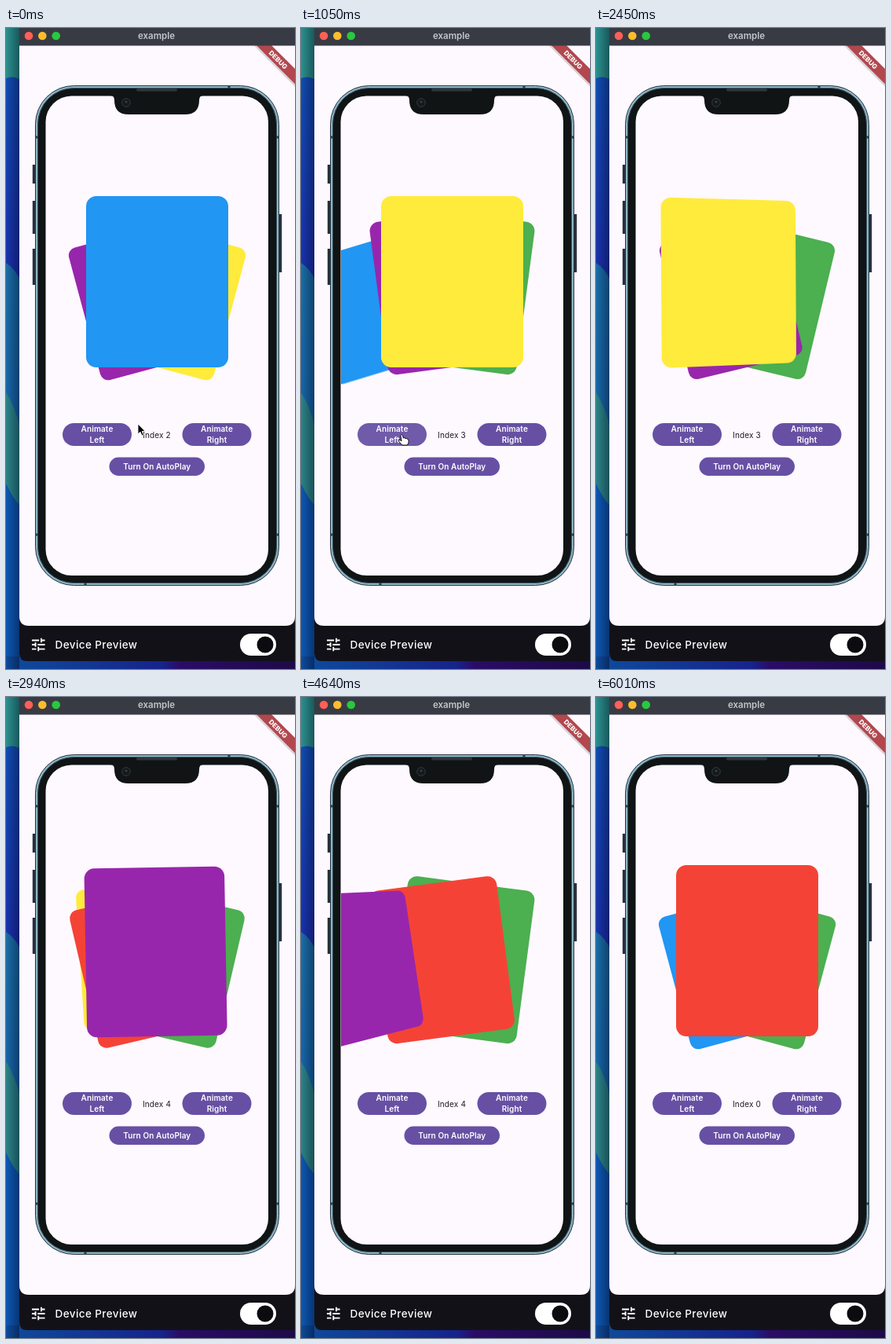
These frames come from a looping animation (368 by 816 pixels, 6080 ms). An HTML page:

```html
<!DOCTYPE html>
<html lang="en">
<head>
<meta charset="utf-8">
<title>Card stack</title>
<style>
  html, body { margin: 0; width: 100%; height: 100%; overflow: hidden; }
  svg { position: absolute; left: 0; top: 0; }
  text { font-family: Inter, Roboto, sans-serif; text-anchor: middle; }
  .label { font-size: 10px; font-weight: 600; fill: #fff; letter-spacing: .1px; }
  .pill { fill: #6750a4; }
  #screen { position: absolute; left: 51px; top: 87px; width: 283px; height: 610px; overflow: hidden; }
  .card { position: absolute; left: 50.5px; top: 126.5px; width: 181px; height: 217.5px; border-radius: 13px; }
</style>
</head>
<body>
<svg width="368" height="816">
  <defs>
    <linearGradient id="shade"><stop offset="0" stop-color="#001" stop-opacity="0"/><stop offset="1" stop-color="#001" stop-opacity=".4"/></linearGradient>
    <linearGradient id="floor"><stop offset="0" stop-color="#0d4c9c"/><stop offset=".54" stop-color="#16238c"/><stop offset=".6" stop-color="#2a0c66"/><stop offset="1" stop-color="#1d0a48"/></linearGradient>
    <linearGradient id="deep" x2="0" y2="1"><stop offset="0" stop-color="#0f55b8"/><stop offset=".4" stop-color="#1b2fae"/><stop offset="1" stop-color="#1b1d92"/></linearGradient>
    <linearGradient id="wave" x2="0" y2="1"><stop offset="0" stop-color="#1a6fa8"/><stop offset="1" stop-color="#0f57ae"/></linearGradient>
  </defs>

  <!-- desktop -->
  <rect width="20" height="816" fill="url(#deep)"/>
  <path d="M0 0H20V66Q8 60 0 64Z" fill="#2b928f"/>
  <path d="M0 299Q12 306 20 325V816H0Z" fill="url(#wave)"/>
  <path d="M0 464Q14 485 20 520V610Q10 602 0 580Z" fill="#2b8488"/>
  <path d="M0 580Q10 602 20 610V816H0Z" fill="#0d58b4"/>
  <rect y="800" width="368" height="16" fill="url(#floor)"/>
  <rect width="17" height="816" fill="url(#shade)"/>

  <!-- window -->
  <path d="M17 0H368V806H27Q17 806 17 796Z" fill="#131118"/>
  <path d="M17 22H368V749Q368 761 356 761H29Q17 761 17 749Z" fill="#fef8ff"/>
  <g transform="translate(346.5 40.5) rotate(45)">
    <rect x="-50" y="-5" width="100" height="14" fill="#000" opacity=".15"/>
    <rect x="-50" y="-7" width="100" height="13.5" fill="#b2474e"/>
    <text y="3" font-size="8.5" font-weight="800" fill="#fff">DEBUG</text>
  </g>
  <rect x="17" width="351" height="22.5" fill="#383b43"/>
  <circle cx="29" cy="10" r="5.3" fill="#ff5f57"/>
  <circle cx="46.3" cy="10" r="5.3" fill="#febc2e"/>
  <circle cx="63.7" cy="10" r="5.3" fill="#28c840"/>
  <text x="191.5" y="13.5" font-size="11.5" font-weight="600" fill="#c4c6cb">example</text>

  <!-- phone -->
  <path d="M35.5 174V198M35.5 220V262M35.5 281V327M349.5 237V311" stroke="#26313d" stroke-width="3.4"/>
  <rect x="37.5" y="73.5" width="310" height="636" rx="49" fill="#8fb5c6" stroke="#25343f"/>
  <rect x="40.5" y="76.5" width="304" height="630" rx="46" fill="#101415" stroke="#3a5563"/>
  <path d="M37 139H41M344 139H348M37 645H41M344 645H348M284 73V77M101 706V710" stroke="#2b3d49" stroke-width="3"/>
  <rect x="50.5" y="86.5" width="283.5" height="610.5" rx="33" fill="#fef8ff"/>
  <path d="M133 86Q138 86 138 92Q138 110 156 110H228Q246 110 246 92Q246 86 251 86Z" fill="#101415"/>
  <rect x="166" y="77" width="52" height="3.5" rx="1.7" fill="#30363a"/>
  <circle cx="153" cy="95" r="5.3" fill="#15191c" stroke="#343a3e"/>
  <circle cx="153" cy="94" r="1.5" fill="#383e42"/>

  <!-- controls -->
  <rect id="leftButton" class="pill" x="72" y="503" width="88" height="29" rx="14.5"/>
  <rect class="pill" x="224.5" y="503" width="88" height="29" rx="14.5"/>
  <rect class="pill" x="131.5" y="546.5" width="121.5" height="23.5" rx="11.7"/>
  <g class="label">
    <text x="116" y="514">Animate</text><text x="116" y="528">Left</text>
    <text x="268.5" y="514">Animate</text><text x="268.5" y="528">Right</text>
    <text x="192.3" y="562">Turn On AutoPlay</text>
  </g>
  <text id="index" x="192" y="521.5" font-size="10" letter-spacing=".15" fill="#1d1b20"></text>

  <!-- bottom bar -->
  <path transform="translate(30.2 774) scale(.92)" fill="#fff" d="M3 17v2h6v-2zM3 5v2h10V5zM13 21v-2h8v-2h-8v-2h-2v6zM7 9v2H3v2h4v2h2V9zM21 13v-2H11v2zM15 9h2V7h4V5h-4V3h-2z"/>
  <text x="115" y="790" font-size="13.5" font-weight="500" letter-spacing=".4" fill="#fff">Device Preview</text>
  <rect x="298" y="771" width="46" height="28" rx="14" fill="#fff"/>
  <circle cx="330" cy="785" r="10.5" fill="#0c0b0f"/>
</svg>

<div id="screen"></div>

<svg width="368" height="816">
  <g id="pointer" stroke-linejoin="round">
    <g id="ring" fill="none">
      <circle r="26.3" stroke="#fff" stroke-width="2.6" opacity=".8"/>
      <circle r="27" stroke="#1c1a20" stroke-width="1.5"/>
    </g>
    <path id="arrow" d="M0 0V13L3 10.2L5.2 15L7.4 14L5.3 9.4H9.2Z" fill="#000" stroke="#fff" stroke-width=".9"/>
    <path id="hand" d="M-1.2 1.5Q0 -.5 1.4 1.5L2.3 5Q4 4 5 5.5Q6.4 4.9 7.2 6.2Q8.8 6 9 8V10.5L7.5 14H.8L-3.6 9Q-4 7 -2 7.4L0 9Z" fill="#fff" stroke="#111"/>
  </g>
</svg>

<script>
const LOOP = 6080, FAN = 15;
const $ = id => document.getElementById(id);
const colors = { red: '#f44336', green: '#4caf50', blue: '#2196f3', yellow: '#ffeb3b', purple: '#9826ac' };
const cards = {};
for (const name in colors) {
  const card = cards[name] = document.createElement('div');
  card.className = 'card';
  card.style.background = colors[name];
  $('screen').append(card);
}

const stacks = [
  { index: 2, top: 'blue', left: 'purple', right: 'yellow' },
  { index: 3, top: 'yellow', left: 'purple', right: 'green' },
  { index: 4, top: 'purple', left: 'red', right: 'green' },
  { index: 0, top: 'red', left: 'blue', right: 'green' }
];
// Each swipe throws the top card out, then brings it back underneath.
const swipes = [
  { out: [[550, 0], [800, 1]], back: [[800, 0], [1300, 1]] },
  { out: [[2350, 0], [2720, .55], [3013, 1]], back: [[2740, 0], [2998, 1]] },
  { out: [[4250, 0], [4640, .5], [4720, .5], [4950, 1]], back: [[4850, 0], [5200, 1]] }
];
const path = [
  [0, 168, 504], [450, 128, 517], [1300, 128, 517], [1900, 251, 344], [2350, 251, 344],
  [2720, 133, 357], [2940, 138, 356], [3100, 138, 356], [3650, 250, 342], [4250, 250, 342],
  [4640, 127, 355], [5000, 127, 355], [5700, 151, 344]
];
const presses = [[1930, 2760], [3720, 4760]];

function track(t, keys, column = 1) {
  const next = keys.findIndex(key => key[0] > t);
  if (next < 0) return keys[keys.length - 1][column];
  if (next === 0) return keys[0][column];
  const a = keys[next - 1], b = keys[next];
  const u = (t - a[0]) / (b[0] - a[0]);
  return a[column] + (b[column] - a[column]) * u * u * (3 - 2 * u);
}

function place(name, z, origin, transform) {
  Object.assign(cards[name].style, { display: 'block', zIndex: z, transformOrigin: origin, transform });
}

function fan(name, z, amount) {
  place(name, z, '50% 100%', `rotate(${FAN * amount}deg) scale(${1 - .2 * Math.abs(amount)})`);
}

function drawCards(t) {
  const i = Math.max(0, swipes.findLastIndex(swipe => t >= swipe.out[0][0]));
  const before = stacks[i], after = stacks[i + 1];
  const out = track(t, swipes[i].out), back = track(t, swipes[i].back);
  const fromLeft = after.top === before.left;
  const side = fromLeft ? -1 : 1;
  const away = out * (1 - back);

  for (const name in cards) cards[name].style.display = 'none';
  if (back > 0) fan(fromLeft ? after.left : after.right, 3, side * back);
  fan(fromLeft ? before.right : before.left, 2, -side * Math.max(1 - out, back));
  fan(after.top, 4, side * (1 - out));
  // At the end of a swipe the thrown card may already serve as a side card.
  if (back < 1) {
    place(before.top, back > 0 ? 1 : 5, '50% 50%',
      `translate(${-213 * away}px, ${70 * away * out}px) rotate(${-34 * away * out}deg)
       scale(${1 - .3 * out + .1 * back}) perspective(730px) rotateY(${140 * out * (1 - out)}deg)`);
  }
  $('index').textContent = 'Index ' + (back > 0 ? after : before).index;
}

function drawPointer(t) {
  const x = track(t, path, 1), y = track(t, path, 2);
  const onButton = x > 72 && x < 160 && y > 503 && y < 532;
  const clickable = onButton || y < 431;
  $('pointer').setAttribute('transform', `translate(${x} ${y})`);
  $('hand').style.display = clickable ? '' : 'none';
  $('arrow').style.display = clickable ? 'none' : '';
  $('ring').style.display = presses.some(([a, b]) => t >= a && t < b) ? '' : 'none';
  $('leftButton').style.fill = onButton ? '#705aaa' : '';
}

function frame() {
  const t = performance.now() % LOOP;
  drawCards(t);
  drawPointer(t);
  requestAnimationFrame(frame);
}
frame();
</script>
</body>
</html>
```
